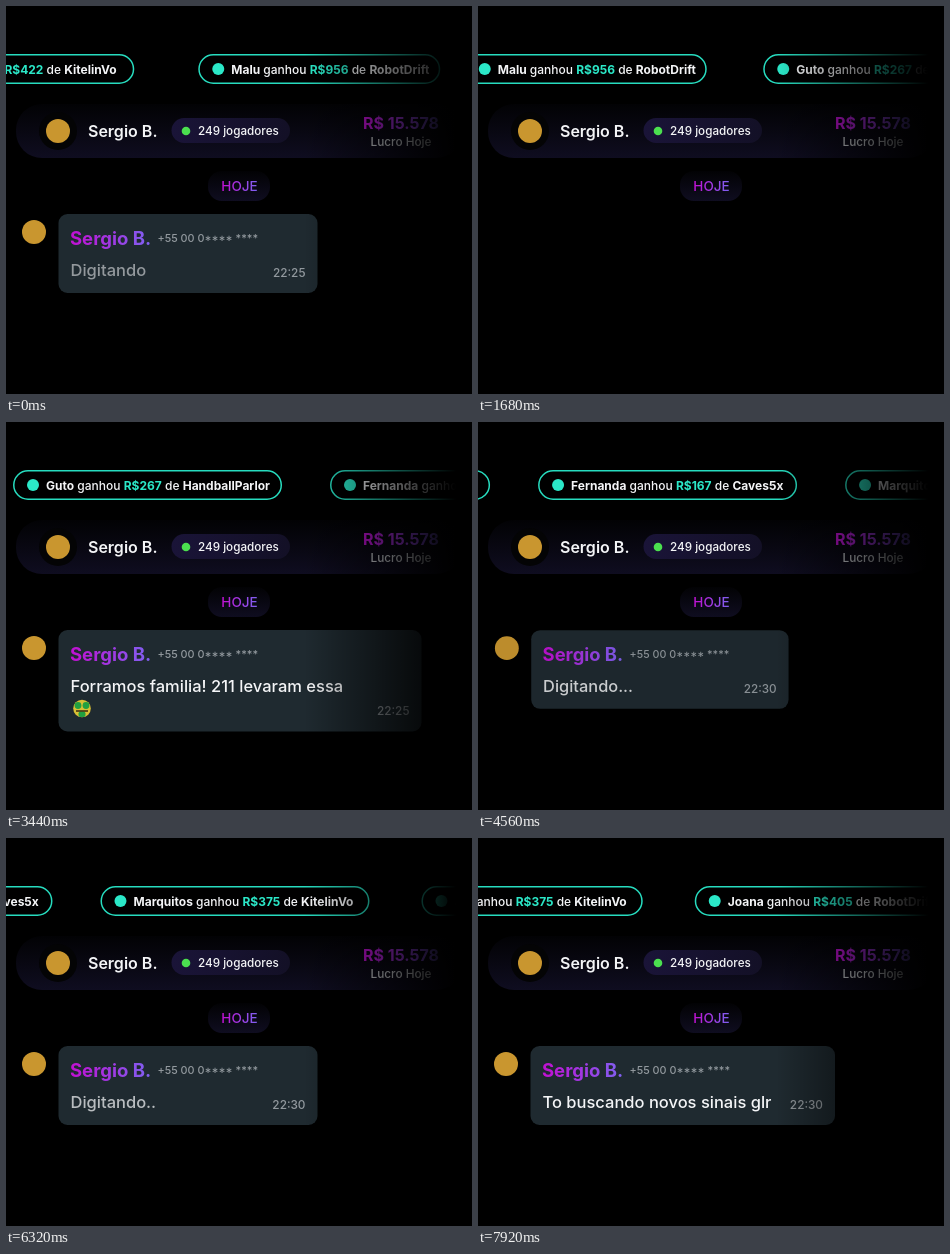
Recreate the animation shown at these times as an HTML page. Size 466 by 388 pixels, loop 8 s.

```html
<!DOCTYPE html>
<html lang="pt-BR">
<head>
<meta charset="utf-8">
<title>Sinais</title>
<style>
  html, body { margin: 0; width: 100%; height: 100%; overflow: hidden; background: #000; }
  svg { display: block; width: 466px; height: 388px; }
  text { font-family: Inter, "Open Sans", sans-serif; font-weight: 500; fill: #f4f5f7; }
  .pill text { font-size: 12px; }
  .b { font-weight: 700; }
  .cash { fill: #2be8c8; }
  .name { font-size: 18.5px; font-weight: 700; }
  .msg { font-size: 16.5px; }
  .dim { fill: #92999e; }
  .ink { fill: url(#ink); }
</style>
</head>
<body>
<svg viewBox="0 0 466 388">
  <defs>
    <linearGradient id="ink"><stop stop-color="#c20fd2"/><stop offset="1" stop-color="#7f62f2"/></linearGradient>
    <linearGradient id="bar" x2="0" y2="1"><stop stop-color="#020204"/><stop offset="1" stop-color="#0f0d20"/></linearGradient>
    <linearGradient id="badge"><stop stop-color="#1a1438"/><stop offset="1" stop-color="#131026"/></linearGradient>
    <linearGradient id="fade" gradientUnits="userSpaceOnUse" x1="298" x2="450">
      <stop stop-color="#000" stop-opacity="0"/><stop offset="1" stop-color="#000"/>
    </linearGradient>
  </defs>

  <g id="ticker"></g>

  <rect x="10" y="98" width="446" height="54" rx="26" fill="url(#bar)"/>
  <circle cx="52" cy="125" r="19" fill="#040405"/>
  <circle cx="52" cy="125" r="12" fill="#c9962f"/>
  <text x="82" y="131" font-size="16" style="font-weight:600">Sergio B.</text>
  <rect x="165.500" y="112" width="118.500" height="25" rx="12.5" fill="url(#badge)"/>
  <circle cx="180" cy="125" r="4.3" fill="#4be04f"/>
  <text x="192" y="129" font-size="11.7">249 jogadores</text>
  <text class="ink b" x="395" y="122.500" font-size="16" text-anchor="middle">R$ 15.578</text>
  <text x="395" y="139.500" font-size="11.8" text-anchor="middle" style="fill:#d3d6da">Lucro Hoje</text>

  <rect x="202" y="165" width="62" height="30" rx="14" fill="url(#bar)"/>
  <text class="ink" x="233.500" y="185" font-size="13.5" text-anchor="middle">HOJE</text>

  <g id="row">
    <circle cx="28" cy="226" r="12" fill="#c9962f"/>
    <rect id="card" x="52.500" y="208" rx="9" fill="#1f2a30"/>
    <text class="name ink" x="64" y="239">Sergio B.</text>
    <text class="dim" x="151.500" y="236" font-size="10.8">+55 00 0**** ****</text>
    <text id="body" class="msg" x="64.500" y="270"></text>
    <g id="emoji">
      <circle cx="76" cy="286.500" r="8.800" fill="#d9c034"/>
      <g fill="#22a040">
        <circle cx="72" cy="283.500" r="3.400"/><circle cx="80" cy="283.500" r="3.400"/>
        <rect x="72.500" y="289.500" width="7" height="5.500" rx="2"/>
      </g>
      <path d="M70 289h12" stroke="#3a2a10" stroke-width="1.500"/>
    </g>
    <text id="clock" class="dim" font-size="11.8" text-anchor="end"></text>
  </g>

  <rect x="290" width="176" height="388" fill="url(#fade)"/>
</svg>

<script>
const LOOP = 8000, SLOT = 312, REST = 141.5, STEP = 2001, LEAD = 537;
const $ = id => document.getElementById(id);

// name, amount, game, pill width
const wins = [
  ['Sandra', 422, 'KitelinVo', 254],
  ['Malu', 956, 'RobotDrift', 242],
  ['Guto', 267, 'HandballParlor', 269],
  ['Fernanda', 167, 'Caves5x', 259],
  ['Marquitos', 375, 'KitelinVo', 269],
  ['Joana', 405, 'RobotDrift', 251]
];

$('ticker').innerHTML = wins.map(([who, cash, game, w], i) => `
  <g class="pill" transform="translate(${(i - 1) * SLOT - w / 2} 48)">
    <rect x=".75" y=".75" width="${w - 1.5}" height="28.5" rx="14.25" stroke="#27dcbf" stroke-width="1.5"/>
    <circle cx="20" cy="15" r="6" fill="#2be8c8"/>
    <text x="33" y="19.5"><tspan class="b">${who}</tspan> ganhou <tspan class="b cash">R$${cash}</tspan> de <tspan class="b">${game}</tspan></text>
  </g>`).join('');

// text (none while typing), clock, card size, enter and leave times
const scenes = [
  { clock: '22:25', w: 259, h: 79, from: -1300, to: 1480 },
  { text: 'Forramos familia! 211 levaram essa', clock: '22:25', w: 363, h: 101.5, from: 1700, to: 4130, emoji: true },
  { clock: '22:30', w: 259, h: 79, from: 4350, to: 7030 },
  { text: 'To buscando novos sinais glr', clock: '22:30', w: 304.5, h: 79, from: 7240, to: 1e5 }
];

const clamp = v => Math.min(1, Math.max(0, v));

// cubic-bezier(.25, .1, .25, 1)
function ease(x) {
  let lo = 0, hi = 1, s;
  for (let i = 0; i < 24; i++) {
    s = (lo + hi) / 2;
    const bx = .75 * s * (1 - s) + s ** 3;
    if (bx < x) lo = s; else hi = s;
  }
  return .3 * s * (1 - s) ** 2 + 3 * s * s * (1 - s) + s ** 3;
}

function drawTicker(t) {
  const n = (t + LEAD) / STEP, k = Math.floor(n);
  $('ticker').setAttribute('transform', `translate(${REST - SLOT * (k - 1 + ease(n - k))} 0)`);
}

function drawRow(t) {
  const s = scenes.findLast(s => t >= s.from);
  const shown = (1 - (1 - clamp((t - s.from) / 350)) ** 3) * (1 - clamp((t - s.to) / 200));
  const scale = .9 + .1 * shown;
  const cx = (68.5 + s.w) / 2, cy = 208 + s.h / 2;
  $('row').setAttribute('transform', `translate(${cx} ${cy}) scale(${scale}) translate(${-cx} ${-cy})`);
  $('row').setAttribute('opacity', shown);
  $('card').setAttribute('width', s.w);
  $('card').setAttribute('height', s.h);

  const dots = '.'.repeat(Math.floor((t + 200) / 600) % 4);
  const pulse = .775 + .225 * Math.cos(2 * Math.PI * (t - 1000) / 1960);
  $('body').textContent = s.text || 'Digitando' + dots;
  $('body').setAttribute('opacity', s.text ? 1 : pulse);
  $('emoji').setAttribute('visibility', s.emoji ? 'visible' : 'hidden');
  $('clock').textContent = s.clock;
  $('clock').setAttribute('x', 40.5 + s.w);
  $('clock').setAttribute('y', 191.7 + s.h);
}

const start = performance.now();
function frame() {
  const t = (performance.now() - start) % LOOP;
  drawTicker(t);
  drawRow(t);
  requestAnimationFrame(frame);
}
frame();
</script>
</body>
</html>
```
